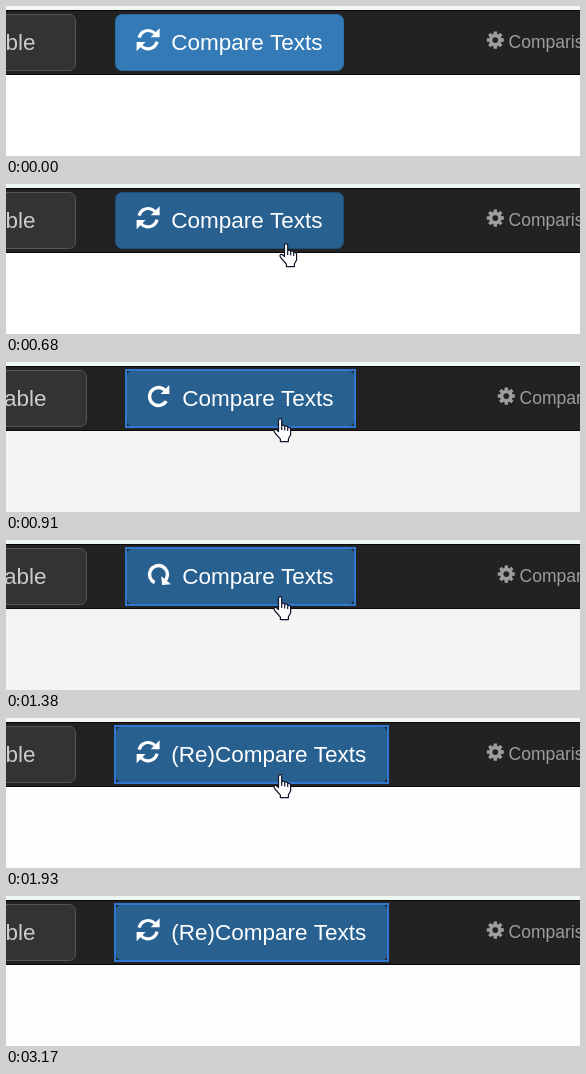
These frames come from a looping animation (574x150 px, 3490 ms). An HTML page with a canvas:

```html
<!DOCTYPE html>
<html lang="en">
<head>
<meta charset="utf-8">
<title>Compare button</title>
<style>
  html, body { margin: 0; width: 100%; height: 100%; overflow: hidden; background: #fff; }
  canvas { display: block; }
</style>
</head>
<body>
<canvas id="stage" width="574" height="150"></canvas>
<script>
const ctx = document.getElementById('stage').getContext('2d', { alpha: false });
const W = 574, H = 150, LOOP = 3490;
const FONT = '"Liberation Sans", Arial, sans-serif';
const TICKS = [0, 220, 300, 370, 450, 530, 600, 680, 760, 840, 910, 1000, 1070, 1150, 1230,
  1300, 1380, 1450, 1530, 1610, 1690, 1760, 1840, 1930, 2860, 2940, 3020, 3090, 3170];
const FOCUS = 840, BUSY = 910, DONE = 1840, LEAVE = 2860, GONE = 3170;
const SPIN_PERIOD = 2000;

const HAND = new Path2D('M5.5 13.5V2.4Q5.5 .7 7.1 .7T8.7 2.4V7.4Q11 6.6 11.7 8.3Q14 7.4 14.7 9.4' +
  'Q17.6 8.8 17.6 11.6V17L15.4 20.8V23.6H7.4V21.2L2 15Q.3 12.6 1.5 11.6Q3 10.6 5.5 13.5Z');
const KNUCKLES = new Path2D('M8.7 7.4V12M11.7 8.3V12.4M14.7 9.4V13');
const ARROW = new Path2D('M.5 .5V16.5L4.2 13L6.6 18.5L9 17.4L6.6 12.1H11.9Z');

const mix = (a, b, k) => a + (b - a) * k;
const between = (t, a, b) => Math.min(1, Math.max(0, (t - a) / (b - a)));

function rect(x, y, w, h, fill) {
  ctx.fillStyle = fill;
  ctx.fillRect(x, y, w, h);
}

function button(x, y, w, h, fill, border) {
  ctx.beginPath();
  ctx.roundRect(x + .5, y + .5, w - 1, h - 1, 6.5);
  ctx.fillStyle = fill;
  ctx.fill();
  ctx.lineWidth = 1;
  ctx.strokeStyle = border;
  ctx.stroke();
}

function label(text, x, y, size, fill, align = 'left') {
  ctx.font = `${size}px ${FONT}`;
  ctx.textAlign = align;
  ctx.fillStyle = fill;
  ctx.fillText(text, x, y);
}

function placed(x, y, angle, draw) {
  ctx.save();
  ctx.translate(x, y);
  ctx.rotate(angle);
  draw();
  ctx.restore();
}

function arc(r, from, to, width) {
  ctx.beginPath();
  ctx.arc(0, 0, r, from, to);
  ctx.lineWidth = width;
  ctx.strokeStyle = '#fff';
  ctx.stroke();
}

function triangle(...p) {
  ctx.beginPath();
  ctx.moveTo(p[0], p[1]);
  ctx.lineTo(p[2], p[3]);
  ctx.lineTo(p[4], p[5]);
  ctx.fillStyle = '#fff';
  ctx.fill();
}

function refreshIcon(x, y) {
  for (const turn of [0, Math.PI]) {
    placed(x, y, turn, () => {
      arc(9.2, Math.PI * 1.07, Math.PI * 1.76, 3.2);
      triangle(11.5, -11.5, 11.5, -2.4, 2.6, -2.4);
    });
  }
}

function spinnerIcon(x, y, angle) {
  placed(x, y, angle, () => {
    arc(9, Math.PI * .17, Math.PI * 1.74, 3.4);
    triangle(10.8, -11.6, 10.8, -2.6, 2, -2.6);
  });
}

function gearIcon(x, y) {
  ctx.beginPath();
  for (let i = 0; i < 8; i++) {
    const a = i * Math.PI / 4;
    for (const [r, d] of [[6.4, -.28], [8.7, -.2], [8.7, .2], [6.4, .28]]) {
      ctx.lineTo(x + r * Math.cos(a + d), y + r * Math.sin(a + d));
    }
  }
  ctx.closePath();
  ctx.moveTo(x + 2.9, y);
  ctx.arc(x, y, 2.9, 0, Math.PI * 2);
  ctx.fillStyle = '#9d9d9d';
  ctx.fill('evenodd');
}

function pointerAt(t) {
  if (t < 220 || t >= GONE) return null;
  if (t < 760) {
    const k = 1 - (1 - between(t, 220, 680)) ** 2;
    return { x: mix(370, 280, k), y: mix(135, 60, k) };
  }
  if (t < LEAVE) {
    const k = between(t, 680, FOCUS);
    return { x: mix(280, 274, k), y: mix(60, 57, k) };
  }
  const k = between(t, LEAVE, 3090) ** 1.3;
  return { x: mix(285, 389, k), y: mix(62, 129, k) };
}

function drawPointer({ x, y }, over) {
  const shape = over ? HAND : ARROW;
  placed(Math.round(x) - (over ? 7 : 0), Math.round(y) - (over ? 1 : 0), 0, () => {
    ctx.fillStyle = '#fff';
    ctx.fill(shape);
    ctx.lineWidth = 1.2;
    ctx.lineJoin = 'round';
    ctx.strokeStyle = '#10142a';
    ctx.stroke(shape);
    if (over) ctx.stroke(KNUCKLES);
  });
}

function render(t) {
  const busy = t >= BUSY && t < DONE;
  const done = t >= DONE;
  const focused = t >= FOCUS;
  const pointer = pointerAt(t);
  const over = pointer !== null && pointer.y < 66;
  const active = over || focused;
  const shift = busy ? 11 : 0;
  const left = 109 + shift;
  const width = done ? 273 : 229;

  rect(0, 0, W, H, busy ? '#f4f4f3' : done ? '#fdfdfd' : '#fff');
  rect(0, 0, W, 4, '#eff7f1');
  rect(0, 4, W, 65, '#080808');
  rect(0, 5, W, 63, '#222');

  button(-40, 8, 110 + shift, 57, '#333', '#555');
  label('able', 29.6 + shift, 43.5, 22.5, '#ccc', 'right');

  button(left, 8, width, 57, active ? '#286090' : '#337ab7', active ? '#204d74' : '#2e6da4');
  if (focused) {
    ctx.lineWidth = 2;
    ctx.lineJoin = 'miter';
    ctx.strokeStyle = '#3176cf';
    ctx.strokeRect(left, 8, width, 57);
  }
  if (busy) spinnerIcon(left + 32.5, 34.5, (t - BUSY) / SPIN_PERIOD * Math.PI * 2);
  else refreshIcon(left + 33.1, 33.7);
  label(done ? '(Re)Compare Texts' : 'Compare Texts', left + 56.2, 43.5, 22.5, '#fff');

  gearIcon(489.3 + shift, 34.1);
  label('Comparison', 502.6 + shift, 41.5, 17.5, '#9d9d9d');

  if (pointer) drawPointer(pointer, over);
}

const start = performance.now();
function frame() {
  const time = (performance.now() - start) % LOOP;
  render(TICKS.findLast(tick => tick <= time));
  requestAnimationFrame(frame);
}
frame();
</script>
</body>
</html>
```
